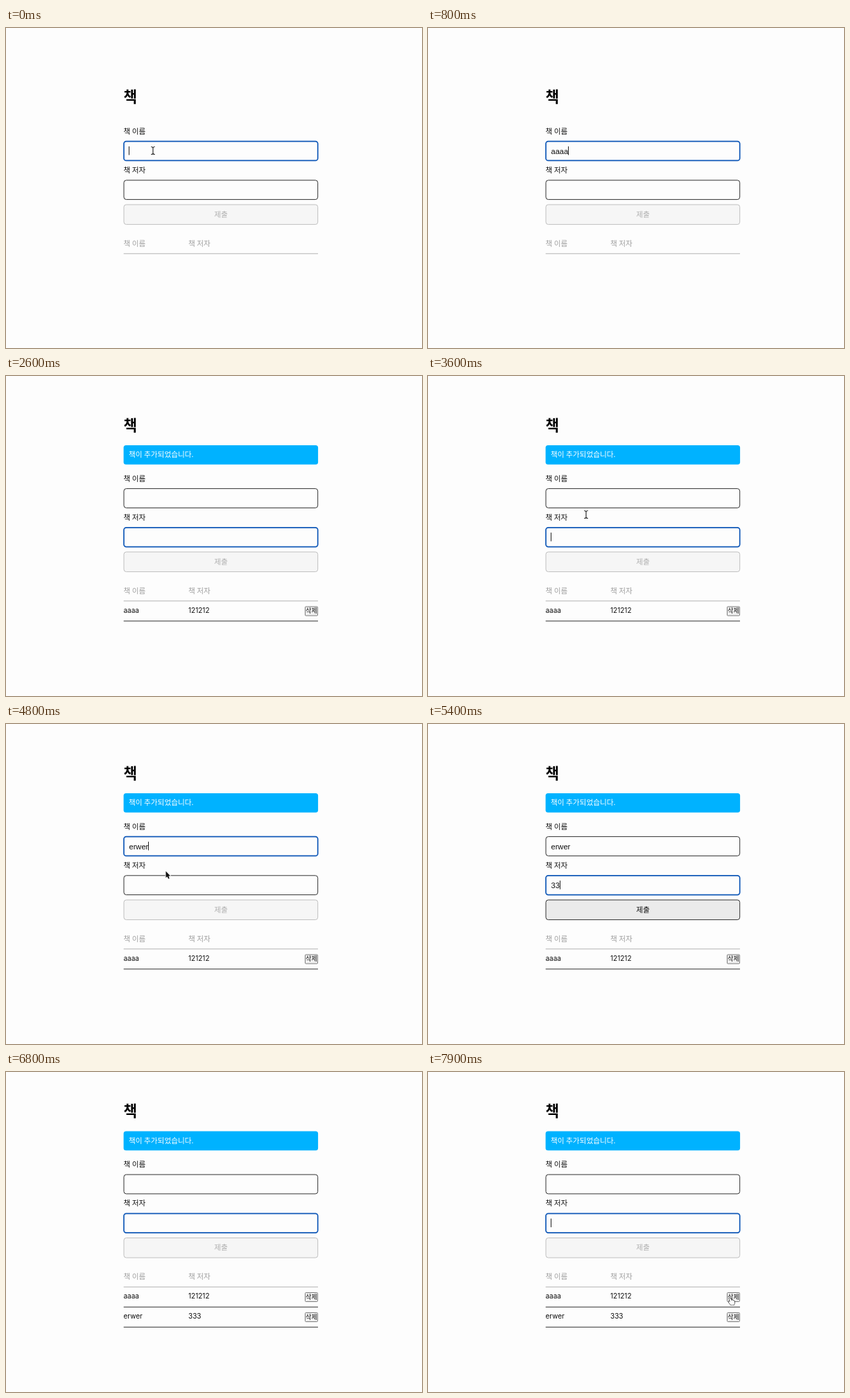
Animation of 600 by 462 pixels, one loop 8 s. Source, as an HTML page with a canvas:

```html
<!DOCTYPE html>
<html lang="ko">
<head>
<meta charset="utf-8">
<title>책</title>
<style>
html, body { margin: 0; width: 100%; height: 100%; overflow: hidden; background: #fdfdfd; }
canvas { display: block; width: 600px; height: 462px; }
</style>
</head>
<body>
<canvas id="stage" width="600" height="462"></canvas>
<script>
const ctx = document.getElementById('stage').getContext('2d');
const LOOP = 8000;
const LEFT = 170, RIGHT = 449.7, WIDTH = RIGHT - LEFT;
const KOREAN = '"Noto Sans CJK KR", "Noto Sans CJK", sans-serif';
const TYPED = '11.1px "Liberation Sans", Arial, sans-serif';
const CELL = '10px Inter, sans-serif';
const INK = '#111', FAINT = '#a0a0a0', BLUE = '#1159b8';

// Form state changes; each one also restarts the caret blink.
const events = [
  { at: 0, name: '', author: '', focus: 0, rows: [], banner: false },
  { at: 300, name: 'a' },
  { at: 500, name: 'aa' },
  { at: 700, name: 'aaa' },
  { at: 800, name: 'aaaa' },
  { at: 1100, focus: 1 },
  { at: 1600, author: '12' },
  { at: 1700, author: '121' },
  { at: 1900, author: '1212' },
  { at: 2100, author: '12121' },
  { at: 2200, author: '121212' },
  { at: 2600, name: '', author: '', rows: [['aaaa', '121212']], banner: true, caret: false },
  { at: 2700, caret: true },
  { at: 3600 },
  { at: 4100, focus: 0 },
  { at: 4300, name: 'e' },
  { at: 4400, name: 'er' },
  { at: 4700, name: 'erwe' },
  { at: 4800, name: 'erwer' },
  { at: 5100, focus: 1 },
  { at: 5400, author: '33' },
  { at: 5600, banner: false },
  { at: 5800, author: '333' },
  { at: 5900, author: '333 ' },
  { at: 6500, author: '333' },
  { at: 6800, name: '', author: '', rows: [['aaaa', '121212'], ['erwer', '333']], banner: true, caret: false },
  { at: 6900, caret: true }
];

// Pointer paths: visible span, then [time, x, y] points.
const paths = [
  { from: 0, to: 400, points: [[0, 212, 177]] },
  { from: 3400, to: 4400, points: [[3400, 229, 224], [3600, 228, 200], [3900, 230, 184], [4100, 230, 181]] },
  { from: 4700, to: 5400, points: [[4700, 230, 186], [4800, 230, 212], [4900, 230, 222], [5000, 230, 225]] },
  { from: 7200, to: 8000, points: [[7200, 230, 225], [7500, 230, 225], [7700, 330, 278], [7900, 435, 326]] }
];

function stateAt(t) {
  const state = { caret: true };
  for (const e of events) if (e.at <= t) Object.assign(state, e);
  state.caret = state.caret && Math.floor((t - state.at) / 500) % 2 === 0;
  return state;
}

function pointerAt(t) {
  const path = paths.find(p => t >= p.from && t < p.to);
  if (!path) return null;
  const pts = path.points;
  const next = pts.findIndex(p => p[0] > t);
  if (next < 0) return pts[pts.length - 1].slice(1);
  const a = pts[next - 1], b = pts[next];
  const k = (t - a[0]) / (b[0] - a[0]);
  return [a[1] + (b[1] - a[1]) * k, a[2] + (b[2] - a[2]) * k];
}

function text(str, x, y, font, color = INK, align = 'left') {
  ctx.font = font;
  ctx.fillStyle = color;
  ctx.textAlign = align;
  ctx.fillText(str, x, y);
}

const korean = (str, x, mid, color, align, size = 10.67) =>
  text(str, x, mid + size * 0.38, `500 ${size}px ${KOREAN}`, color, align);

function box(x, y, w, h, r, fill, stroke, line = 1) {
  ctx.beginPath();
  ctx.roundRect(x, y, w, h, r);
  if (fill) { ctx.fillStyle = fill; ctx.fill(); }
  if (stroke) { ctx.strokeStyle = stroke; ctx.lineWidth = line; ctx.stroke(); }
}

function rule(y, color) {
  ctx.fillStyle = color;
  ctx.fillRect(LEFT - 0.3, y - 0.5, WIDTH + 0.6, 1);
}

function field(y, value, focused, caret) {
  box(LEFT, y, WIDTH, 27.8, 3.5, '#fdfdfd', focused ? BLUE : '#333', focused ? 1.7 : 1);
  text(value, 177.5, y + 17.9, TYPED);
  if (focused && caret) {
    ctx.font = TYPED;
    ctx.fillStyle = '#222';
    ctx.fillRect(Math.round(177.3 + ctx.measureText(value).width), y + 7.3, 1, 12.5);
  }
}

function drawForm(s) {
  const lift = s.rows.length * 14.5;
  const dy = s.banner ? 14 - lift - 0.5 : -lift;
  const titleY = s.banner ? 85 - lift : 98.6 - lift;

  text('책', LEFT - 0.6, titleY + 8.4, `bold 21.3px ${KOREAN}`, '#000');
  if (s.banner) {
    box(LEFT - 0.4, 114.4 - lift, WIDTH + 0.8, 27.8, 3.5, '#00b2ff');
    korean('책이 추가되었습니다.', 177, 127.6 - lift, '#fff');
  }

  const top = s.banner ? dy : -lift;
  korean('책 이름', LEFT - 0.4, 148.5 + top);
  field(163.6 + top, s.name, s.focus === 0, s.caret);
  korean('책 저자', LEFT - 0.4, 204.6 + top);
  field(219.8 + top, s.author, s.focus === 1, s.caret);

  const ready = s.name && s.author;
  box(LEFT, 255 + top, WIDTH, 28.6, 3.5, ready ? '#ebebeb' : '#f6f6f6', ready ? '#333' : '#c0c0c0');
  korean('제출', 310, 268.6 + top, ready ? INK : '#b0b0b0', 'center');

  korean('책 이름', LEFT - 0.4, 310.7 + top, FAINT);
  korean('책 저자', 263, 310.7 + top, FAINT);
  rule(325.8 + top, '#b4b4b4');
  s.rows.forEach(([name, author], i) => {
    const y = 325.8 + top + i * 29;
    text(name, LEFT - 0.5, y + 16.8, CELL);
    text(author, 263, y + 16.8, CELL);
    box(431.5, y + 8.2, 18, 13, 1, '#efefef', '#7c7c7c');
    korean('삭제', 440.5, y + 14.3, INK, 'center', 8.9);
    rule(y + 29, '#333');
  });
  return top;
}

function outline(points, fill, stroke, width) {
  ctx.beginPath();
  points.forEach(([x, y]) => ctx.lineTo(x, y));
  ctx.closePath();
  ctx.lineJoin = 'round';
  ctx.lineWidth = width;
  ctx.strokeStyle = stroke;
  ctx.stroke();
  ctx.fillStyle = fill;
  ctx.fill();
}

function beam() {
  ctx.beginPath();
  for (const s of [-1, 1]) {
    ctx.moveTo(-2.7, s * 5.5);
    ctx.quadraticCurveTo(0, s * 5.5, 0, s * 3.5);
    ctx.quadraticCurveTo(0, s * 5.5, 2.7, s * 5.5);
  }
  ctx.moveTo(0, -4.5);
  ctx.lineTo(0, 4.5);
  ctx.strokeStyle = '#222';
  ctx.lineWidth = 1.1;
  ctx.stroke();
}

const arrow = () => outline(
  [[0.5, 0.5], [0.5, 10], [2.6, 8.2], [4.1, 11.6], [5.8, 10.9], [4.4, 7.6], [7.2, 7.4]],
  '#111', '#fff', 1.6);

const hand = () => outline(
  [[-0.8, 0.6], [0.3, 0], [1.3, 0.8], [2.1, 3.4], [4, 3.2], [5.8, 4], [7, 5], [7.2, 7.4],
   [6.2, 10.4], [2, 10.4], [-0.6, 7.4], [-1.6, 5.6], [-0.8, 5], [0.6, 6]],
  '#fff', '#222', 1.3);

function drawPointer(t, top) {
  const p = pointerAt(t);
  if (!p) return;
  const [x, y] = p;
  const inside = from => y >= from + top && y <= from + top + 28;
  const overField = inside(163) || inside(219.8);
  const overLabel = y > 195 + top && y < 210 + top;
  ctx.save();
  ctx.translate(x, y);
  if (x > 431 && y > 318) hand();
  else if (overField || overLabel) beam();
  else arrow();
  ctx.restore();
}

function frame() {
  const t = Math.floor(performance.now() % LOOP / 100) * 100;
  ctx.fillStyle = '#fdfdfd';
  ctx.fillRect(0, 0, 600, 462);
  const top = drawForm(stateAt(t));
  drawPointer(t, top);
  requestAnimationFrame(frame);
}
frame();
</script>
</body>
</html>
```
